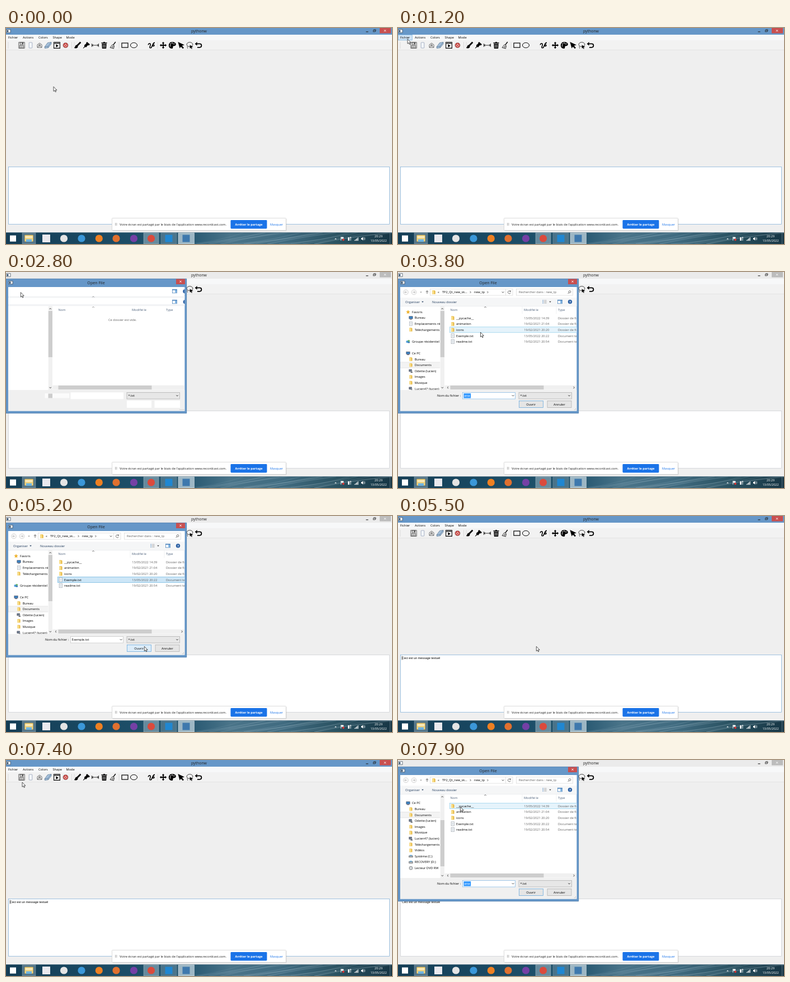
These frames come from a looping animation (690 by 388 pixels, 8000 ms). An HTML page:

```html
<!DOCTYPE html>
<html lang="fr">
<head>
<meta charset="utf-8">
<title>pythonw</title>
<style>
html, body { margin: 0; width: 100%; height: 100%; overflow: hidden; background: #efefef; }
svg { display: block; width: 690px; height: 388px; }
text { font-family: "Open Sans", "Noto Sans", sans-serif; white-space: pre; }
</style>
</head>
<body>
<svg id="stage" viewBox="0 0 690 388" xmlns="http://www.w3.org/2000/svg"></svg>
<script>
const stage = document.getElementById('stage');

// Drawing helpers: each returns SVG markup.
const rect = (x, y, w, h, fill = 'none', stroke = 'none', more = '') =>
  `<rect x="${x}" y="${y}" width="${w}" height="${h}" fill="${fill}" stroke="${stroke}" stroke-width=".7" ${more}/>`;
const text = (x, y, s, fill = '#000', size = 5.65, more = '') =>
  `<text x="${x}" y="${y + 2}" font-size="${size}" fill="${fill}" ${more}>${s}</text>`;
const line = (d, stroke = '#111', w = 1, fill = 'none') =>
  `<path d="${d}" fill="${fill}" stroke="${stroke}" stroke-width="${w}"/>`;
const shape = (d, fill = '#000') => `<path d="${d}" fill="${fill}"/>`;
const disc = (x, y, r, fill, stroke = 'none', w = .8) =>
  `<circle cx="${x}" cy="${y}" r="${r}" fill="${fill}" stroke="${stroke}" stroke-width="${w}"/>`;
const group = (id, body, more = '') => `<g id="${id}" ${more}>${body}</g>`;
const at = (x, y, body, k = 1) => `<g transform="translate(${x} ${y}) scale(${k})">${body}</g>`;
const down = (x, y, c = '#333') => line(`M${x - 1.8} ${y - 1}l1.8 1.8l1.8 -1.8`, c, .9);
const up = (x, y, c = '#333') => line(`M${x - 1.8} ${y + 1}l1.8 -1.8l1.8 1.8`, c, .9);
const drop = (x, y, c = '#333') => shape(`M${x - 1.8} ${y - .9}h3.6l-1.8 2z`, c);
const cross = (x, y, c) => line(`M${x - 1.6} ${y - 1.6}l3.2 3.2m0 -3.2l-3.2 3.2`, c, .9);
const appIcon = (x, y) => rect(x - 3.5, y - 2.8, 7, 5.6, '#fff', '#345') + rect(x - 2.6, y - 1.6, 2.4, 3.4, '#246');

const BLUE = '#6697c8';

const icons = {
  save: rect(-5.2, -5.2, 10.4, 10.4, '#fff', '#222') + rect(-3, -5, 6, 3.8, '#ddd', '#222') +
    rect(.8, -4.5, 1.2, 2.4, '#222') + rect(-3.6, .6, 7.2, 4.4, '#fff', '#222') + line('M-2.4 2.1h4.8M-2.4 3.6h4.8', '#444', .6),
  page: rect(-2.8, -5, 5.6, 10, '#f3f6fb', '#8797ae', 'rx=".8"'),
  open: line('M-4 -1L0 -4L4 -1V4H-4Z', '#444', .8, '#fafafa') + disc(0, 0, 1.4, '#fff', '#222') + line('M-4 4L-1 1.4M4 4L1 1.4', '#444', .7),
  eraser: line('M-6 3L-.5 -4.5L5.8 -5.5L6 -2.5L.5 4.5L-5.5 5.5Z', '#54718f', .7, '#a5c0db') + line('M-6 3L0 2L5.8 -5.5M0 2l.5 2.5', '#54718f', .7),
  play: rect(-6, -6, 12, 12, '#111') + rect(-4.8, -2.6, 9.6, 7.2, '#fff') + shape('M-1.7 -1.7L3 1L-1.7 3.7Z') +
    line('M-4.8 -4.4h9.6', '#fff', 1.4).replace('/>', ' stroke-dasharray="1.6 1.1"/>'),
  quit: disc(0, 0, 4.6, '#c3322d', '#a59a9a', .9) + line('M-1.6 -1.4A2.2 2.2 0 1 0 1.6 -1.4M0 -2.8V.2', '#fff', .9),
  brush: line('M5.4 -5.4L-.8 .8', '#000', 2.8) + shape('M-2 -.4C-4.6 0 -3.8 3.2 -6.2 4.8C-3 6.2 .8 5 .6 2Z'),
  marker: shape('M1 -6L6 -1.5L3.8 .4L2.5 -.2L-.6 3.4L-3 3.2L-5.4 5.6H-6.4L-3.8 2L-4 -.2L-.4 -3.2L-.8 -4.4Z'),
  width: line('M-6 0H6M-6 -3V3M6 -3V3M-3.5 -1.8L-5.5 0L-3.5 1.8M3.5 -1.8L5.5 0L3.5 1.8', '#000', .8),
  trash: shape('M-5 -5H-1.8L-1.2 -6H1.2L1.8 -5H5V-3.6H-5Z') + shape('M-4.2 -2.8H4.2L3.6 6H-3.6Z') + line('M-1.9 -1.4V4.5M0 -1.4V4.5M1.9 -1.4V4.5', '#eee', .7),
  broom: line('M4.8 -6L.8 -.6', '#000', 1.4) + line('M-.8 -1.2L2.6 1L1.4 6L-5 4.2Z', '#000', .8, '#fff') + line('M-2.8 4.4L0 1M-.8 5L1.2 1.2', '#000', .7),
  box: rect(-5.5, -4, 11, 8, 'none', '#000', 'style="stroke-width:1.2"'),
  oval: '<ellipse rx="6" ry="4.6" fill="none" stroke="#000"/>',
  curve: line('M-5.8 -.6C-5 -4.4 -1.2 -4 -1.8 -.6C-2.4 2.4 -4.4 5 -1.4 4.8C1.4 4.4 .6 -.6 3 -1.2C5.4 -1.4 5.4 1.6 3.4 1.6C1 1.6 2.4 -4.4 6 -4.6', '#000', 1.6),
  move: shape('M0 -6.2L2.4 -3.4H.9V-.9H3.4V-2.4L6.2 0L3.4 2.4V.9H.9V3.4H2.4L0 6.2L-2.4 3.4H-.9V.9H-3.4V2.4L-6.2 0L-3.4 -2.4V-.9H-.9V-3.4H-2.4Z'),
  palette: shape('M0 -6C9 -6 8 2 3.2 1.2C-.2 1 3 5.6 -.4 6C-8 6 -8 -6 0 -6Z') + disc(-3.4, 1, 1, '#eee') + disc(-3, -2.2, 1, '#eee') + disc(0, -3.9, 1, '#eee') + disc(3.3, -2.4, 1, '#eee'),
  pick: shape('M-5.6 -6L6 -.6L1.6 .8L5 4.6L3 6.2L-.4 2.4L-2.4 5.6Z'),
  lasso: '<ellipse cy="-1.4" rx="5.4" ry="4" fill="none" stroke="#111" stroke-width=".8"/>' + line('M-3.6 1.6C-6 3 -3 4 -4 6', '#111', .7) + shape('M0 -.6L6.2 3L3.2 3.6L4.4 6.2L3 6.6L2 4.2L.4 6Z'),
  undo: line('M-4.5 -2.6H2.4C6.4 -2.6 6.4 3.8 2.4 3.8H-2', '#000', 1.8) + shape('M-6.4 -2.6L-2.4 -6V.8Z'),
  folder: shape('M-2.8 -3.4H1.2L2.8 -2.4V3.4H-2.8Z', '#e9bd4f') + shape('M-2.8 -3.4L.4 -2.2V3.8L-2.8 3.2Z', '#f9df8c'),
  file: rect(-2.7, -3.6, 5.4, 7.2, '#fff', '#9aa3ad') + line('M-1.5 -1.5h3M-1.5 0h3M-1.5 1.5h3', '#9ab', .5),
  star: shape('M0 -4L1.2 -1.2L4 -1L1.8 .8L2.6 3.8L0 2.1L-2.6 3.8L-1.8 .8L-4 -1L-1.2 -1.2Z', '#eeb32f'),
  screen: rect(-3.4, -2.8, 6.8, 4.6, '#3a83c4', '#445') + line('M-2 3h4', '#445', 1),
  home: disc(-1.4, .6, 2.4, '#4b9bd8') + disc(1.4, -1, 2, '#6bb36b') + disc(1.6, 1.8, 1.7, '#3a76b8'),
  drive: rect(-3.6, -1, 7.2, 3, '#aab1b8', '#666') + rect(-2.4, -2.4, 4.8, 1.2, '#3a98d8'),
  disk: disc(0, 0, 3.3, '#c9ced3', '#777') + disc(0, 0, 1, '#fff'),
  user: rect(-3.4, -2.8, 5, 4, '#6d7f92', '#445') + disc(1.4, .4, 1.3, '#8a8f96') + shape('M-.8 3.6C-.8 1 3.6 1 3.6 3.6Z', '#555d66'),
  pane: rect(-4, -3.3, 8, 6.6, '#fff', '#3c78b5') + rect(.8, -2.4, 2.6, 5, '#75aee2') + line('M-4 -2.5h8', '#3c78b5', 1.2)
};
const icon = (name, x, y, k) => at(x, y, icons[name], k);

const tools = [['save', 28], ['page', 44], ['open', 60], ['eraser', 75], ['play', 91], ['quit', 106.5], ['brush', 128],
  ['marker', 144], ['width', 159.5], ['trash', 175.5], ['broom', 191], ['box', 212.5], ['oval', 228.5], ['curve', 260],
  ['move', 281], ['palette', 297], ['pick', 313], ['lasso', 328.5], ['undo', 344]];

function mainWindow() {
  let s = rect(0, 0, 690, 368, '#efefef');
  s += rect(0, 0, 690, 12, BLUE, 'none', 'id="bar"') + appIcon(4.5, 5.5);
  s += text(345, 5.7, 'pythonw', '#222', 6.9, 'text-anchor="middle"');
  s += rect(668, 0, 20, 9.5, '#c94f4f', 'none', 'id="close"') + cross(677.5, 4.8, '#fff');
  s += line('M643.5 6.8h4', '#222', 1.1) + rect(656.4, 4, 3.4, 2.8, 'none', '#222') + line('M657.6 3.8V2.8h3.4v2.8h-1', '#222', .7);
  s += rect(0, 12, 690, 10.5, '#f7f8f9') + rect(0, 22.5, 690, 16.5, '#f2f2f2') + line('M0 39.5H690', '#e0e0e0', .8);
  s += rect(.6, 12.5, 24.6, 9.3, '#d3e6f7', '#72aede', 'id="hot"');
  [['Fichier', 4], ['Actions', 30], ['Colors', 58], ['Shape', 83.5], ['Mode', 107.5]].forEach(([n, x]) => s += text(x, 17, n));
  [4, 117.5, 122, 202, 271].forEach(x => s += line(`M${x} 25V37`, '#d2d2d2', .7));
  tools.forEach(([n, x]) => s += icon(n, x, 31));
  s += rect(4.5, 249.5, 681, 103, '#fff', '#79acd6', 'id="edit"');
  s += group('message', text(7, 255, 'Ceci est un message textuel', '#000', 5.45, 'style="font-family:\'Liberation Sans\',sans-serif"') +
    group('caret', line('M7.3 251.5V258.5', '#111', .7)));
  return s;
}

const entries = [['New...', 'Ctrl+N', 'page'], ['Open text...', 'Ctrl+O', 'open'], ['Open canvas...', '', 'eraser'],
  ['Play animation...', '', 'play'], ['Save text...', 'Ctrl+S'], ['Save canvas...', '', 'save'], ['Quit...', 'Ctrl+Q', 'quit']];

function menu() {
  let s = rect(.4, 22.6, 99, 79.6, '#f1f1f1', '#9b9b9b') + line('M14.4 24V101', '#dcdcdc', .7);
  s += rect(1.3, 0, 96.4, 10.8, '#d3e4f4', '#86b6df', 'id="pick"');
  entries.forEach(([name, key, ico], i) => {
    const y = 29.2 + 11.1 * i;
    s += text(17.5, y, name) + text(72.3, y, key);
    if (ico) s += icon(ico, 7, y, .72);
  });
  return s;
}

const places = [['star', 'Favoris', 0], ['screen', 'Bureau', 1], ['file', 'Emplacements récents', 1], ['folder', 'Téléchargements', 1], null,
  ['home', 'Groupe résidentiel', 0], null, ['screen', 'Ce PC', 0], ['folder', 'Bureau', 1], ['folder', 'Documents', 1],
  ['user', 'Odette (lucien)', 1], ['folder', 'Images', 1], ['folder', 'Musique', 1], ['user', 'Lucien47 (lucien)', 1],
  ['folder', 'Téléchargements', 1], ['folder', 'Vidéos', 1], ['drive', 'Système (C:)', 1], ['drive', 'RECOVERY (D:)', 1], ['disk', 'Lecteur DVD RW', 1]];
const files = [['__pycache__', '13/05/2022 14:39'], ['animation', '19/02/2021 21:04'], ['icons', '19/02/2021 20:20'],
  ['Exemple.txt', '13/05/2022 20:22'], ['readme.txt', '19/02/2021 20:54']];
const ROW = 10.6;

function navigation() {
  let s = '';
  [14, 28.5].forEach((x, i) => {
    s += disc(x, 36.3, 4.4, '#fafafa', '#c9c9c9') + at(x, 36.3, line('M2 0H-2M-.3 -1.8L-2.1 0L-.3 1.8', '#b5b5b5', .9), i ? '-1 1' : 1);
  });
  s += drop(41, 36.3, '#999') + line('M52 39V33.8M50 35.8L52 33.6L54 35.8', '#555', .9);
  s += rect(57.5, 30.5, 147.5, 11.5, '#fff', '#d6d6d6') + icon('folder', 64, 36.3);
  s += text(71, 36, '«') + text(79, 36.2, 'TP2_Qt_new_sk...') + text(136, 36.2, 'new_tp');
  [128.6, 159.4].forEach(x => s += line(`M${x} 34.6l1.7 1.7l-1.7 1.7`, '#333', .8));
  s += down(187.5, 36.4) + line('M192.5 30.5V42', '#d6d6d6', .7) + line('M201 34.6A2.6 2.6 0 1 0 201.4 37.4M201.4 33V35.2H199.2', '#555', .8);
  s += rect(211.5, 30.5, 101, 11.5, '#fff', '#d6d6d6') + text(216, 36.2, 'Rechercher dans : new_tp', '#606060');
  s += disc(307, 35.5, 1.9, 'none', '#555') + line('M305.6 37l-2 2', '#555', .9);
  s += text(13, 53.5, 'Organiser', '#1e395b') + drop(44, 53.6, '#1e395b') + text(61, 53.5, 'Nouveau dossier', '#1e395b');
  [51, 53.4, 55.8].forEach(y => s += rect(258.5, y - .6, 1.4, 1.2, '#4a83bb') + line(`M261 ${y}h4.6`, '#888', .7));
  s += drop(272, 53.6) + icon('pane', 289.5, 53.5);
  return s + disc(307.5, 53.5, 3.7, '#2e62a5') + text(306.2, 53.5, '?', '#fff', 5.6, 'font-weight="700"');
}

function sidebar() {
  let s = '';
  places.forEach((p, i) => {
    if (!p) return;
    const y = 71.7 + ROW * i, x = 18 + 5 * p[2];
    if (p[1] === 'Documents') s += rect(4, y - 5.1, 71.6, 10.2, '#f3f3f3', '#dedede');
    s += icon(p[0], x, y, .92) + text(x + 7 - p[2] * .3, y, p[1]);
  });
  return s;
}

function fileList() {
  let s = rect(92.5, 0, 230, 10, '#e5f3fb', '#8fcdea', 'id="hover"') + rect(92.5, 109.5, 230, 10, '#cde6f7', '#6cb4dd', 'id="chosen"');
  files.forEach(([name, date], i) => {
    const y = 82.7 + ROW * i, dir = i < 3;
    s += icon(dir ? 'folder' : 'file', 97.8, y) + text(104, y, name) + text(225.3, y, date, '#606060', 5.55);
    s += text(286, y, dir ? 'Dossier de fichiers' : 'Document texte', '#606060');
  });
  return s;
}

function dialog() {
  let s = rect(0, 12, 323, 242, BLUE) + line('M.3 254V12.3H322.7V253.7H0', '#4f7dab', .7) + appIcon(8.5, 19);
  s += text(161, 19.8, 'Open File', '#222', 7.1, 'text-anchor="middle"') + rect(304, 12.5, 16, 9.5, '#c94f4f') + cross(312, 17.2, '#fff');
  s += rect(4, 27, 315.4, 222.5, '#fff') + rect(4, 212, 315.4, 37.5, '#f0f0f0');
  s += rect(75.8, 61.5, 7.2, 150.5, '#f0f0f0') + rect(75.8, 70, 7.2, 83, '#cdcdcd', 'none', 'id="thumb"') + up(79.2, 66) + down(79.2, 207.8);
  s += rect(83.5, 203.6, 235.6, 8, '#f0f0f0') + rect(93.5, 203.9, 167, 7.2, '#cdcdcd');
  s += text(93.5, 68, 'Nom', '#4c607a') + text(225, 68, 'Modifié le', '#4c607a') + text(286, 68, 'Type', '#4c607a') + up(156, 63, '#888');
  s += rect(216, 216.5, 94.5, 11.5, '#e7e7e7', '#acacac') + text(218.5, 222.2, '*.txt') + down(306, 222.2);
  // Parts still loading
  s += group('loading',
    rect(4, 43.5, 315.4, 3, '#f2f3f5') + rect(4, 58, 315.4, 3.2, '#f2f3f5') + up(156, 44.5, '#888') +
    icon('pane', 301.5, 34.5) + icon('pane', 301.5, 53.5) +
    shape('M319.4 31A3.8 3.8 0 0 0 319.4 38.5ZM319.4 50A3.8 3.8 0 0 0 319.4 57.3Z', '#2e62a5') +
    text(183, 86, 'Ce dossier est vide.', '#606060') + rect(69.5, 218, 43.5, 8.5, '#fbfbfb') + rect(75.5, 218.5, 7.5, 8, '#cdcdcd') +
    rect(115.5, 216.3, 94.5, 12, '#fff') + rect(216, 231, 44, 13, '#fff') + rect(265.5, 231, 45.5, 13, '#fff') + line('M310 247.3h9.4', '#ccc', .8));
  s += group('loaded',
    rect(4, 27, 315.4, 19.2, '#fff') + rect(4, 46.2, 315.4, 15.2, '#f5f6f7') + line('M4 61.4H319.4', '#e3e5e8', .6) + up(156, 63, '#888') + navigation() +
    `<g clip-path="url(#side)">${group('tree', sidebar())}</g><g clip-path="url(#list)">${fileList()}</g>` +
    line('M222 62V75M283 62V75', '#e4e7eb', .6) +
    line('M90 205.8l-1.8 1.8l1.8 1.8M313.6 205.8l1.8 1.8l-1.8 1.8', '#333', .9) +
    text(70, 222.2, 'Nom du fichier :') + rect(115.5, 216.5, 94, 11.5, '#fff', '#a9bfd3', 'id="field"') + down(205.6, 222.2) +
    group('old', rect(117.4, 218, 12.8, 8.6, '#3399ff') + text(118.6, 222.2, 'ana', '#fff')) +
    group('picked', text(117.6, 222.2, 'Exemple.txt')) +
    rect(216.5, 231.5, 43, 12, '#e5e5e5', '#5fa4dc', 'id="ok"') + text(237.7, 237.5, 'Ouvrir', '#000', 5.65, 'text-anchor="middle"') +
    rect(267, 231.5, 43, 12, '#e5e5e5', '#acacac') + text(288.4, 237.5, 'Annuler', '#000', 5.65, 'text-anchor="middle"') +
    [[317, 247], [315, 247], [317, 245]].map(([x, y]) => rect(x, y, 1, 1, '#b5b5b5')).join(''));
  return s;
}

function banner() {
  return rect(190.5, 342.5, 311, 22, '#000', 'none', 'opacity=".12" rx="1"') + rect(189.5, 341.5, 311, 22, '#fff', '#cccccc', 'rx="1"') +
    line('M195.6 350V355M197.8 350V355', '#999', .8) +
    text(203, 352.6, "Votre écran est partagé par le biais de l'application www.recordcast.com.", '#222', 5.68) +
    rect(401.5, 345, 65, 15.5, '#1a73e8', 'none', 'rx="1.4"') +
    text(434, 352.6, 'Arrêter le partage', '#fff', 5.5, 'font-weight="700" text-anchor="middle"') + text(472, 352.6, 'Masquer', '#1a73e8', 5.6);
}

function taskbar() {
  let s = rect(0, 367.4, 690, 21, 'url(#dusk)');
  for (let i = 0; i < 12; i++) {
    const x = 320 + i * 21;
    s += line(`M${x} 388Q${x + 55} ${385 - i % 4 * 3} ${x + 105 + i % 3 * 18} 367.5`, `rgba(200,220,230,${.1 + i % 3 * .05})`, 1.2 + i % 2);
  }
  s += line('M0 367.7H690', '#43677d', .7);
  [[29, 24, .3], [246, 27, .36], [277, 28, .2], [308, 28.5, .62]].forEach(([x, w, o]) =>
    s += rect(x, 368, w, 20, '#e4f0f7', '#fff', `fill-opacity="${o}" stroke-opacity="${o}"`));
  s += rect(7, 372.6, 11, 11, '#fff');
  s += rect(33.5, 372, 15, 11.5, '#f1d583', '#c9a24a', 'rx="1"') + rect(34.5, 374.5, 13, 2, '#fff6d8') + rect(36, 379.5, 10, 4.5, '#6fb3df');
  s += rect(65, 371, 14, 14, '#e9e9ee');
  [[103.5, '#e4e4e4'], [135, '#3b97d8'], [166.3, '#ee8022'], [197, '#e0702f'], [228.5, '#7440a5'], [259.5, '#db4a3c']]
    .forEach(([x, c]) => s += disc(x, 378, 6.6, c));
  s += rect(284.5, 371.5, 13, 13, '#2087d2') + rect(315.5, 371.5, 13, 13, '#3e78ad');
  s += shape('M587.4 379.5h3.6l-1.8 -2z', '#fff') + line('M598.8 375V382', '#fff', .8) + rect(599.2, 375.4, 4.2, 3.2, '#fff') + disc(603, 380.3, 1.9, '#d33');
  s += rect(611.3, 376, 2.6, 6, '#fff') + line('M616 375V382M614.8 376.6h2.4', '#fff', .9);
  for (let i = 0; i < 5; i++) s += rect(622.8 + i * 1.5, 381 - i * 1.2, 1, 1.2 + i * 1.2, '#fff');
  s += shape('M635 377.1h1.4l2 -1.8v6.4l-2 -1.8h-1.4z', '#fff') + line('M639.6 376.8q1.2 1.7 0 3.4M640.8 375.8q1.9 2.7 0 5.4', '#fff', .6);
  s += text(666, 374, '20:29', '#fff', 5.6, 'text-anchor="middle"') + text(666, 382.4, '13/05/2022', '#fff', 5.5, 'text-anchor="middle"');
  return s + line('M686.5 368V388', '#6f8795', .7);
}

stage.innerHTML = `<defs>
  <linearGradient id="dusk"><stop offset="0" stop-color="#143d55"/><stop offset=".35" stop-color="#1d4f69"/>
  <stop offset=".49" stop-color="#2b5b74"/><stop offset=".58" stop-color="#4a7489"/><stop offset=".72" stop-color="#406b80"/>
  <stop offset=".87" stop-color="#28505f"/><stop offset="1" stop-color="#173645"/></linearGradient>
  <clipPath id="side">${rect(4, 62, 71.2, 149.8, '#000')}</clipPath><clipPath id="list">${rect(84, 62, 235.4, 141, '#000')}</clipPath></defs>` +
  mainWindow() + group('shade', line('M3 102.8H100.6V25', '#8a8a8a', 1) + line('M4 103.8H101.6V26', '#c9c9c9', 1)) +
  group('menu', menu()) + group('dialog', dialog()) + banner() + taskbar() +
  group('mouse', line('M0 0V8.4L1.9 6.6L3.3 9.6L4.6 9L3.3 6.1H5.9Z', '#111', .7, '#fff'));

const el = {};
stage.querySelectorAll('[id]').forEach(n => el[n.id] = n);
const show = (id, on) => el[id].setAttribute('visibility', on ? 'inherit' : 'hidden');
const set = (id, name, v) => el[id].setAttribute(name, v);

// Pointer stops: time, x, y
const stops = [[0, 85, 105.4], [500, 85, 105.4], [1300, 14, 16], [1700, 14, 16], [2200, 26.3, 36.6], [2900, 26.3, 36.6], [3600, 146, 104],
  [3800, 147.5, 108.3], [4000, 148, 113], [4300, 148, 113], [5000, 247.3, 234.3], [5500, 247.3, 234.3], [6300, 18, 15.6],
  [6600, 18, 15.6], [6900, 29, 51], [7100, 29, 40], [7500, 29, 40], [7900, 111.4, 84.2], [8000, 111.4, 84.2]];

function pointer(t) {
  const i = stops.findIndex(s => s[0] > t), [t0, x0, y0] = stops[i - 1], [t1, x1, y1] = stops[i];
  const k = (t - t0) / (t1 - t0), e = k * k * (3 - 2 * k);
  return [x0 + (x1 - x0) * e, y0 + (y1 - y0) * e];
}

function draw(time) {
  const t = Math.floor(time % 8000 / 100) * 100;
  const within = (a, b) => t >= a && t < b;
  const [x, y] = pointer(t);
  const menuOn = within(1500, 2500) || within(6500, 7400);
  const shadeOn = menuOn || within(6400, 6500);
  const dialogOn = within(2600, 5400) || t >= 7500;
  const loading = within(2600, 2900) || within(7500, 7700);
  const second = t >= 7500, chosen = within(4000, 5400);

  set('mouse', 'transform', `translate(${x} ${y})`);
  set('bar', 'fill', dialogOn ? '#ebebeb' : BLUE);
  set('edit', 'stroke', dialogOn ? '#c9ccd0' : '#79acd6');
  set('close', 'fill', dialogOn ? '#bcbcbc' : '#c94f4f');
  show('hot', shadeOn || (!dialogOn && x < 25 && y > 12 && y < 22));
  show('message', t >= 5500);
  show('caret', t >= 5500 && !dialogOn);

  show('shade', shadeOn);
  show('menu', menuOn);
  const item = Math.floor((y - 23.6) / 11.1);
  show('pick', menuOn && item >= 0);
  set('pick', 'y', 23.8 + 11.1 * Math.max(item, 0));

  show('dialog', dialogOn);
  show('loading', loading);
  show('loaded', !loading);
  show('chosen', chosen);
  show('picked', chosen);
  show('old', !chosen);
  set('field', 'stroke', chosen ? '#c4c4c4' : '#7db4e4');
  const row = Math.floor((y - 77.4) / ROW);
  show('hover', !loading && x > 92 && x < 319 && row >= 0 && row < files.length && !(chosen && row === 3));
  set('hover', 'y', 77.6 + ROW * row);
  set('ok', 'fill', x > 216 && x < 260 && y > 231 && y < 244 ? '#dcecf9' : '#e5e5e5');
  set('tree', 'transform', `translate(0 ${second ? -68.4 : 0})`);
  set('thumb', 'y', second && !loading ? 108 : 70);
}

const start = performance.now();
function tick() {
  draw(performance.now() - start);
  requestAnimationFrame(tick);
}
tick();
</script>
</body>
</html>
```
